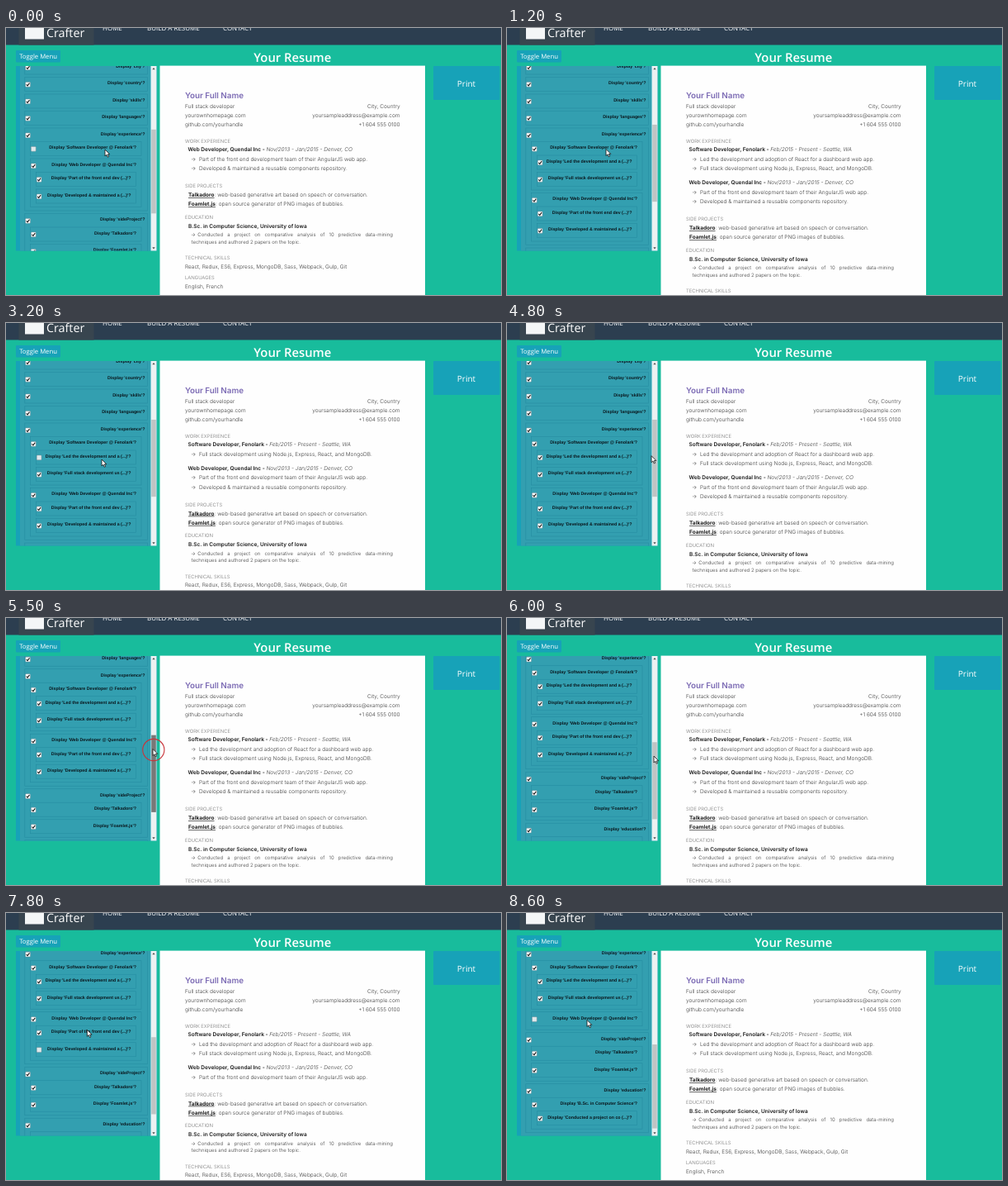
An HTML page that plays this animation: 600 by 323 pixels, repeating every 8.7 s.

```html
<!DOCTYPE html>
<html lang="en">
<head>
<meta charset="utf-8">
<title>Resume editor</title>
<style>
  html, body { margin: 0; width: 100%; height: 100%; overflow: hidden; background: #18bc9c; }
  svg { display: block; width: 100vw; height: 100vh; }
  text { text-rendering: geometricPrecision; white-space: pre; }
  .ui { font-family: "Open Sans", "Noto Sans", sans-serif; fill: #fff; }
  .row { font: bold 5.3px "Liberation Sans", Arial, sans-serif; fill: #0a161c; text-anchor: end; }
  .box { fill: none; stroke: #12708c; stroke-opacity: .4; stroke-width: .6; }
  .doc { font: 300 6.5px Inter, "Open Sans", sans-serif; fill: #3c3c3c; }
  .doc .head { font-size: 5.9px; fill: #777; }
  .doc .bold { font-weight: 600; fill: #1c1c1c; }
  .doc .link { font-weight: 700; fill: #1c1c1c; text-decoration: underline; }
  .doc .when { font-style: italic; }
  .doc .name { font-size: 9.8px; font-weight: 600; fill: #7c6bb4; }
  .doc .para { font-size: 6px; }
  .end { text-anchor: end; }
  .mid { text-anchor: middle; }
</style>
</head>
<body>
<svg viewBox="0 0 600 323" preserveAspectRatio="none">
  <defs><clipPath id="view"><rect x="12" y="46" width="163.5" height="223.5"/></clipPath></defs>
  <rect width="600" height="323" fill="#18bc9c"/>
  <rect width="600" height="20.5" fill="#2c3e50"/>
  <rect x="15.5" width="91" height="20.5" fill="#38454f"/>
  <rect x="23" y="-9" width="23" height="22.5" fill="#f4f6f7"/>
  <g class="ui">
    <text x="49" y="10.5" font-size="14.3">Crafter</text>
    <g font-size="8">
      <text x="117" y="2.6">HOME</text>
      <text x="171" y="2.6">BUILD A RESUME</text>
      <text x="263" y="2.6">CONTACT</text>
    </g>
    <rect x="12" y="27" width="54" height="14.5" rx="1" fill="#17a2b8"/>
    <text class="mid" x="39" y="37.2" font-size="7.7">Toggle Menu</text>
    <text class="mid" x="347.3" y="41.3" font-size="14.8" font-weight="600">Your Resume</text>
    <rect x="518" y="46" width="80.5" height="41" rx="1" fill="#17a2b8"/>
    <text class="mid" x="558" y="70.8" font-size="10">Print</text>
  </g>

  <rect x="12" y="46" width="171" height="223.5" fill="#17a2b8"/>
  <g clip-path="url(#view)">
    <rect x="17" y="40" width="158" height="240" fill="#339fb0"/>
    <g id="menu"></g>
  </g>
  <rect x="175.5" y="46" width="7" height="223.5" fill="#ecf1f1"/>
  <path d="M177.3 50.2h3.4l-1.7-2.2zM177.3 265.3h3.4l-1.7 2.2z" fill="#505050"/>
  <rect id="thumb" x="176.2" width="5.6"/>

  <rect x="186.5" y="45.6" width="321.5" height="277.4" fill="#fefefe"/>
  <g class="doc">
    <text class="name" x="217" y="84.7">Your Full Name</text>
    <text x="217" y="96.7">Full stack developer</text>
    <text x="217" y="108">yourownhomepage.com</text>
    <text x="217" y="119.3">github.com/yourhandle</text>
    <g class="end">
      <text x="477.5" y="96.7">City, Country</text>
      <text x="477.5" y="108">yoursampleaddress@example.com</text>
      <text x="477.5" y="119.3">+1 604 555 0100</text>
    </g>
    <text class="head" x="217" y="138.7">WORK EXPERIENCE</text>
    <g id="jobs"></g>
    <g id="rest"></g>
  </g>

  <circle id="ring" r="13.1" fill="none" stroke="#c8343a" stroke-width="1.1"/>
  <path id="cursor" d="M0 0V8L1.9 6.3L3.2 9.2L4.6 8.6L3.3 5.8H5.8Z" fill="#fff" stroke="#111" stroke-width=".8" stroke-linejoin="round"/>
</svg>
<script>
const LOOP = 8700, TOP = 46, VIEW = 223.5, TRACK = 211, START = 157;
const DRAG = { from: 5100, to: 5700, y0: 134, y1: 167 };
const $ = id => document.getElementById(id);

const jobs = [
  { id: 'soft', role: 'Software Developer', firm: 'Fenolark', when: 'Feb/2015 - Present - Seattle, WA', items: [
    { id: 'led', text: 'Led the development and adoption of React for a dashboard web app.' },
    { id: 'full', text: 'Full stack development using Node.js, Express, React, and MongoDB.' }] },
  { id: 'web', role: 'Web Developer', firm: 'Quendal Inc', when: 'Nov/2013 - Jan/2015 - Denver, CO', items: [
    { id: 'part', text: 'Part of the front end development team of their AngularJS web app.' },
    { id: 'dev', text: 'Developed &amp; maintained a reusable components repository.' }] }
];

// The cut counts visible characters, so an entity is one
const brief = text => text.replace('&amp;', '&').slice(0, 25).trim().replace('&', '&amp;') + ' (...)';
const node = (label, kids = [], id = label) => ({ label, kids, id });
const tree = [
  ...['city', 'country', 'skills', 'languages'].map(s => node(s)),
  node('experience', jobs.map(j =>
    node(`${j.role} @ ${j.firm}`, j.items.map(i => node(brief(i.text), [], i.id)), j.id))),
  node('sideProject', [node('Talkadoro'), node('Foamlet.js')]),
  node('education', [node('B.Sc. in Computer Science', [node(brief('Conducted a project on comparative'))])])
];

// id, time of the click, state from then on
const clicks = [
  ['soft', 500, true], ['led', 2400, false], ['led', 4050, true],
  ['dev', 7100, false], ['web', 8300, false]
];
// time, x, y of the pointer
const path = [
  [0, 120, 147], [1500, 120, 146.5], [2200, 116, 165], [4150, 116, 165], [4780, 175, 161],
  [DRAG.from, 178, DRAG.y0], [DRAG.to, 178, DRAG.y1], [6200, 178, 167], [6850, 101, 165.5],
  [7400, 101, 165.5], [8050, 97, 129.5], [LOOP, 97, 129.5]
];

function offAt(t) {
  const off = new Set(['soft']);
  for (const [id, at, on] of clicks) if (t >= at) off[on ? 'delete' : 'add'](id);
  return off;
}

function pointerAt(t) {
  const i = path.findIndex((p, k) => k && t <= p[0]);
  const [a, b] = [path[i - 1], path[i]];
  const u = (t - a[0]) / (b[0] - a[0]), e = u * u * (3 - 2 * u);
  return [a[1] + (b[1] - a[1]) * e, a[2] + (b[2] - a[2]) * e];
}

const write = (x, y, s, cls = '') => `<text x="${x}" y="${y + 2.2}" class="${cls}">${s}</text>`;
const span = (s, cls) => `<tspan class="${cls}">${s}</tspan>`;

function checkbox(x, y, on) {
  return `<rect x="${x - 2.9}" y="${y - 2.9}" width="5.8" height="5.8" rx=".8" fill="${on ? '#fff' : '#dfe9ec'}" stroke="#7d8f96" stroke-width=".5"/>` +
    (on ? `<path d="M${x - 1.8} ${y}l1.4 1.5l2.4 -3.2" fill="none" stroke="#1a1a1a" stroke-width="1.1"/>` : '');
}

// Rows in content coordinates; returns markup and the content height
function menuMarkup(off) {
  let y = START, last = y, out = '';
  const visit = (n, depth) => {
    const on = !off.has(n.id), x = 26.5 + 6.8 * depth, right = [168.5, 158, 151.5][depth], top = y - 7;
    out += write(right, y - .3, `Display '${n.label}'?`, 'row') + checkbox(x, y + 1.8, on);
    last = y;
    let bottom = y + 10;
    if (on && n.kids.length) {
      y += 16.5;
      for (const k of n.kids) bottom = visit(k, depth + 1);
      y += 4.5;
      bottom += 4.5;
    } else y += 20.5;
    out += `<rect class="box" x="${x - 3.7}" y="${top}" width="${right + 6 - x + 3.7 - 3 * (depth < 1)}" height="${bottom - top}"/>`;
    return bottom;
  };
  tree.forEach(n => visit(n, 0));
  return { out, height: last + 27 };
}

function jobsMarkup(off) {
  let y = 147, out = '';
  for (const j of jobs.filter(j => !off.has(j.id))) {
    out += write(220.5, y, span(`${j.role}, ${j.firm} - `, 'bold') + span(j.when, 'when'));
    for (const i of j.items.filter(i => !off.has(i.id))) {
      y += 11.5;
      out += write(224, y, '→') + write(234, y, i.text);
    }
    y += 17;
  }
  return { out, end: y + 4.2 };
}

$('rest').innerHTML =
  write(217, 0, 'SIDE PROJECTS', 'head') +
  write(221, 10.7, span('Talkadoro', 'link') + ': web-based generative art based on speech or conversation.') +
  write(221, 22, span('Foamlet.js', 'link') + ': open source generator of PNG images of bubbles.') +
  write(217, 37.4, 'EDUCATION', 'head') +
  write(221, 48.5, 'B.Sc. in Computer Science, University of Iowa', 'bold') +
  write(224, 59, '→', 'para') +
  `<g word-spacing="3.5">${write(232.3, 59, 'Conducted a project on comparative analysis of 10 predictive data-mining', 'para')}</g>` +
  write(224.8, 67.5, 'techniques and authored 2 papers on the topic.', 'para') +
  write(217, 87, 'TECHNICAL SKILLS', 'head') +
  write(217, 97.5, 'React, Redux, ES6, Express, MongoDB, Sass, Webpack, Gulp, Git') +
  write(217, 111, 'LANGUAGES', 'head') +
  write(217, 122, 'English, French');

let shown = null, height = 0;

function draw(t) {
  const off = offAt(t), key = [...off].join();
  if (key !== shown) {
    shown = key;
    const menu = menuMarkup(off), work = jobsMarkup(off);
    height = menu.height;
    $('menu').innerHTML = menu.out;
    $('jobs').innerHTML = work.out;
    $('rest').setAttribute('transform', `translate(0 ${work.end})`);
  }

  const [x, y] = pointerAt(t);
  const pulled = t < DRAG.from ? 0 : t < DRAG.to ? y - DRAG.y0 : DRAG.y1 - DRAG.y0;
  const scroll = START + pulled * 510 / TRACK;
  const held = t >= DRAG.from - 50 && t < DRAG.to + 50;
  $('menu').setAttribute('transform', `translate(0 ${TOP - scroll})`);
  $('thumb').setAttribute('y', 51.5 + scroll / height * TRACK);
  $('thumb').setAttribute('height', VIEW / height * TRACK);
  $('thumb').setAttribute('fill', held ? '#787878' : '#bfc4c4');

  const pressed = held || clicks.some(c => t >= c[1] - 110 && t < c[1] + 100);
  $('ring').setAttribute('visibility', pressed ? 'visible' : 'hidden');
  $('ring').setAttribute('transform', `translate(${x + .8} ${y + 1})`);
  $('cursor').setAttribute('transform', `translate(${x} ${y})`);
}

function tick() {
  draw(performance.now() % LOOP);
  requestAnimationFrame(tick);
}
tick();
</script>
</body>
</html>
```
